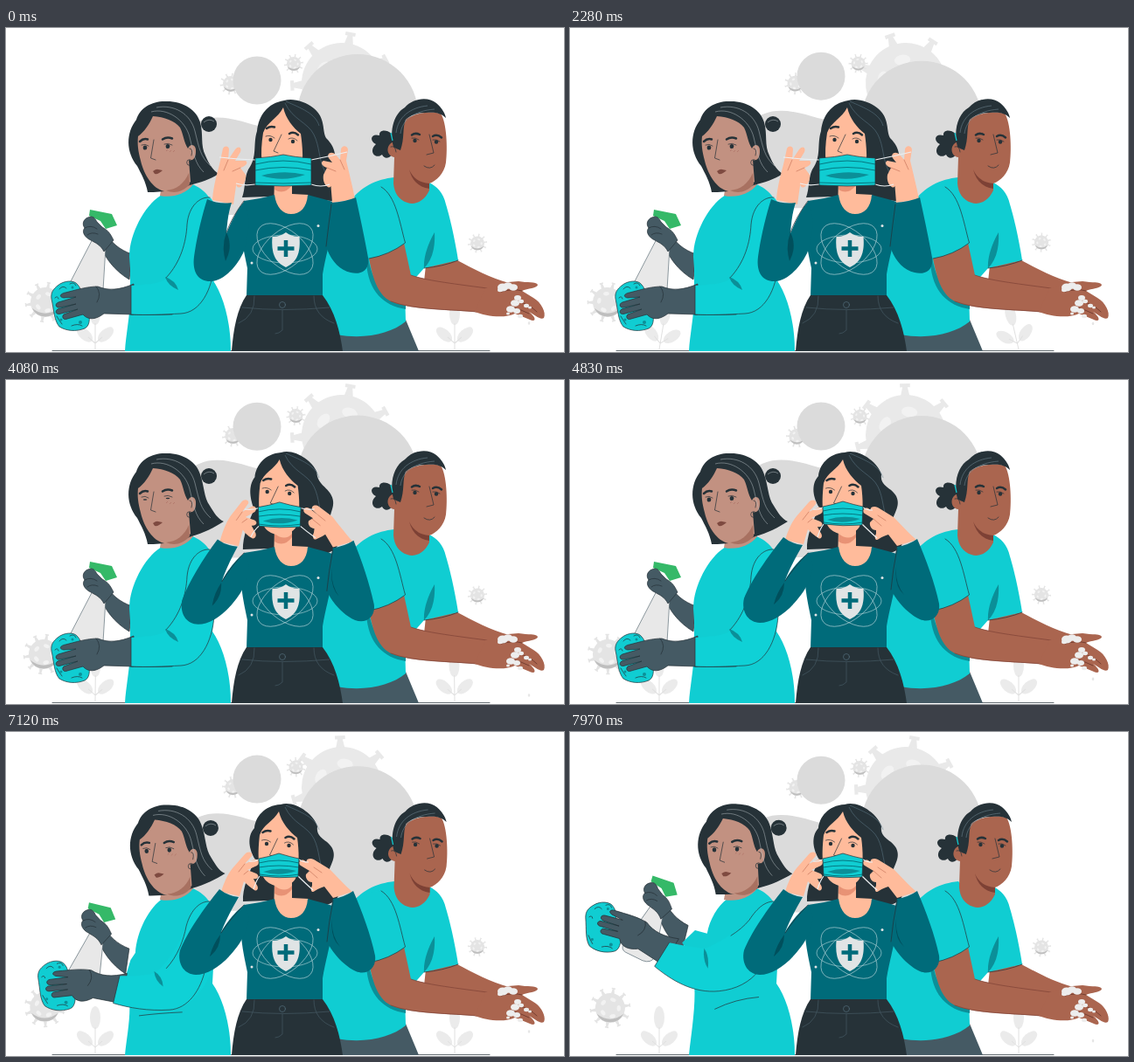
Write an HTML page that moves like this. It is 638 px wide and 371 px high and loops after 8000 ms.

```html
<!DOCTYPE html>
<html lang="en">
<head>
<meta charset="utf-8">
<title>Stay protected</title>
<style>
html, body { margin: 0; width: 100%; height: 100%; overflow: hidden; background: #fff; }
svg { display: block; width: 100vw; height: 100vh; }
.ln { fill: none; stroke: #263238; stroke-width: .7; stroke-linecap: round; stroke-linejoin: round; }
.brow { fill: none; stroke: #263238; stroke-width: 2.5; stroke-linecap: round; }
.strand { fill: none; stroke: #b5bec2; stroke-width: .5; }
.hair { fill: #263238; }
.cyan { fill: #10cdd2; }
.fold { fill: #0b8f98; }
.sweat { fill: #006b7a; }
.deep { fill: #004f5c; }
.skin { fill: #ffbb9b; }
.tan { fill: #c29181; }
.brown { fill: #aa654f; }
.glove { fill: #455a64; }
.edge { stroke: #263238; stroke-width: .7; stroke-linejoin: round; }
</style>
</head>
<body>
<svg viewBox="0 0 638 371" preserveAspectRatio="none">
  <g id="bigVirus"></g>
  <g fill="#dbdbdb">
    <path id="blob" d="M206 190 C205 140 200 104 222 97 C240 89 265 96 284 102 C305 106 320 108 345 115 V205 H206Z"/>
    <path id="dome" d="M333 99 A69 69 0 0 1 471 99 V205 H333Z"/>
  </g>
  <g id="viruses"></g>
  <circle id="ball" cx="287" r="27.5" fill="#dbdbdb"/>
  <g id="plants"></g>
  <path class="ln" d="M53 369.5H553"/>

  <!-- woman with spray and sponge -->
  <g id="spray">
    <path class="glove edge" d="M113 233 C120 246 130 254 144 259 L141 288 C124 278 112 262 108 248Z"/>
    <path d="M104 232 L115 234 L111 300 Q108 308 98 306 L77 299 Q71 296 74 290Z" fill="#e8e8e8" stroke="#455a64" stroke-width=".6"/>
    <path d="M96 208 L121 213 L127 226 L114 230 L108 221 L95 215Z" fill="#35b968"/>
    <path class="glove edge" d="M97 216 C89 217 86 224 90 229 C86 233 90 240 97 243 C102 246 108 248 112 256 L123 243 C119 235 117 232 110 228 L104 222 C102 218 100 216 97 216Z"/>
    <path class="ln" d="M90 229 Q97 225 104 230 M93 237 Q98 233 105 236"/>
  </g>
  <path class="cyan" data-k="wipe" d="M180 190 C160 200 141 235 141 262 L142 275 L142 300 C143 325 137 350 136 370 L257 370 C257 335 248 305 236 288 L240 215 C238 196 226 184 213 179 C203 190 190 194 180 190Z" data-to="M180 191 C169 199 160 214 157 230 L143 226 L128 240 C152 275 140 330 136 370 L257 370 C257 335 248 305 236 288 L240 215 C238 196 226 184 213 179 C203 190 190 194 180 191Z"/>
  <path class="ln" data-k="wipe" d="M142 328 Q160 329 190 328" data-to="M166 317 Q190 305 216 303"/>
  <path class="tan" d="M178 180 L213 150 L214 179 C206 190 190 195 176 192Z"/>
  <g id="headL">
    <circle class="hair" cx="232" cy="110" r="9"/>
    <path class="strand" d="M226 108 Q232 103 238 107"/>
    <path class="hair" data-k="tip" d="M150 158 C137 142 137 120 149 105 C153 91 168 83 184 84 C203 84 218 94 222 108 C226 122 222 134 228 146 C232 156 237 163 243 167 C234 173 222 177 210 180 C196 186 180 188 162 188 C160 176 154 166 150 158Z" data-to="M150 158 C137 142 137 120 149 105 C153 91 168 83 184 84 C203 84 218 94 222 108 C227 122 226 134 233 144 C238 152 242 159 249 162 C238 169 226 175 212 179 C196 186 180 188 162 188 C160 176 154 166 150 158Z"/>
    <path class="tan" d="M151 124 C158 119 164 110 168 101 C181 102 193 106 199 114 C203 122 203 130 208 138 C211 131 218 134 217 142 C217 149 213 153 209 151 L211 176 C203 186 190 189 181 187 C168 184 158 169 154 152 C151 141 150 133 151 124Z"/>
    <path d="M183 186 C195 185 204 178 209 166 L210 179 C202 188 192 190 183 186Z" fill="#a87161"/>
    <path class="strand" d="M166 96 C184 91 205 105 210 125 S216 155 226 165 M172 91 C192 87 211 98 216 118 S222 147 234 158"/>
    <path class="brow" d="M153 130 Q157 126 162 127.500 M179 127.500 Q184 124 190 126.500"/>
    <ellipse class="eyeL hair" cx="159" cy="137" rx="2.300"/>
    <ellipse class="eyeL hair" cx="185" cy="135.500" rx="2.300"/>
    <path class="ln" d="M155 134 Q159 132 163 135 M181 133 Q185 131 190 134 M169 128 L165.500 149 L171 151 M210 138 Q214 138 212 146"/>
    <path d="M168 164 Q172 161 174 162 L179 163 Q174 168 170 167Z" fill="#7e4a40"/>
    <path d="M183 141 l2 -2 M187 142 l2 -2 M191 142 l2 -2" stroke="#a96b60" stroke-width=".6"/>
    <circle class="ln" cx="210" cy="154" r="3.300"/>
  </g>
  <g id="sponge">
    <path class="cyan edge" d="M59 295 C66 289 78 288 82 294 C88 300 85 310 91 318 C97 327 97 341 90 344 C80 348 69 347 61 342 C55 335 55 324 52 310 C51 303 54 299 59 295Z"/>
    <path class="ln" d="M61 299 Q65 294 69 298 M73 293 Q78 290 80 295 M58 330 Q61 335 64 339 M75 341 Q82 338 87 341 M56 309 q3 -3 4 1"/>
    <g class="fold"><circle cx="76" cy="297" r="1.500"/><circle cx="63" cy="334" r="1.500"/><circle cx="85" cy="337" r="2"/></g>
  </g>
  <g id="wiper">
    <path class="glove edge" d="M146 293 C130 300 117 301 105 296 C92 296 80 300 68 303 C62 304 60 308 66 309 L80 308 L60 314 C55 316 57 321 62 320 L80 316 L59 322 C55 325 58 329 63 327 L82 322 L66 328 C63 331 66 335 70 333 L88 328 C94 335 103 334 112 327 L146 328Z"/>
    <path class="ln" d="M103 296 Q110 304 104 314"/>
  </g>
  <path data-k="wipe" fill="#0fd1d6" d="M143 295 C160 294 175 293 184 287 C200 270 206 245 207 225 C209 203 222 193 233 194 C243 200 240 240 238 270 C236 300 222 326 200 327 C180 328 160 329 143 328Z" data-to="M113 240 C128 243 143 246 154 247 C172 240 190 228 205 215 C215 200 224 194 233 194 C243 205 243 230 236 250 C225 270 200 292 170 296 C140 299 115 283 96 267Z"/>
  <path class="ln" data-k="wipe" d="M183 286 C200 268 206 245 207 225 C209 203 222 193 233 194 M238 270 C236 300 222 326 200 327 C180 328 160 329 143 328 L143 295" data-to="M184 232 C192 227 199 222 205 215 C215 200 224 194 233 194 M215 274 C205 286 190 294 170 296 C140 299 115 283 96 267 L113 240"/>
  <path class="fold" data-k="wipe" d="M182 285 Q194 289 197 300 Q185 295 182 285Z" data-to="M153 247 Q159 256 157 270 Q151 260 153 247Z"/>

  <!-- man washing hands -->
  <path class="glove" d="M376 345 L457 334 L472 370 H380Z"/>
  <path class="brown" d="M480 272 L516 266 C535 276 553 286 575 292 L570 312 C535 302 505 294 478 290Z"/>
  <path class="cyan" d="M444 171 C424 173 404 182 393 200 L352 260 L354 300 L378 351 C410 357 440 350 457 336 L456 300 L478 275 L517 266 C513 240 507 215 503 202 C500 188 492 181 484 177 L464 195Z"/>
  <path class="fold" d="M490 234 C491 252 487 266 478 275 C477 262 483 246 490 234Z M414 262 C418 290 432 308 457 316 V322 C432 318 414 302 412 268Z"/>
  <path class="brown" d="M415 264 L455 246 L463 283 C485 290 520 294 560 299 L556 327 C515 322 465 324 440 313 C424 305 419 284 415 264Z"/>
  <path class="cyan" d="M394 203 C403 184 425 179 436 185 C447 200 452 225 457 246 Q438 260 415 264Z"/>
  <path class="ln" d="M429 182 C446 192 450 223 456.500 246 Q438 260 415 264 M517 266 Q500 273 478 275"/>
  <path class="ln" style="stroke:#7d4135" d="M463 283 C480 289 505 292 550 298 M440 313 C465 323 510 322 538 325"/>
  <path class="brown" d="M548 298 C560 296 566 292 574 291 L586 290 C596 292 606 290 608 294 C608 298 596 298 590 301 L603 309 C612 314 618 326 615 332 C611 335 604 328 598 325 C607 332 606 337 599 334 L582 327 C570 333 548 330 536 325Z"/>
  <path class="ln" style="stroke:#5f2f26" d="M566 302 Q580 298 590 301 M585 313 Q598 316 607 325 M580 320 Q590 323 598 327"/>
  <g id="foam" fill="#ededed"></g>
  <ellipse id="drop" rx="1.300" fill="#e6e6e6"/>
  <g id="headR">
    <path class="hair" d="M441 121 C434 115 426 117 427 123 C417 120 415 129 423 133 C414 141 422 151 430 145 C434 153 443 147 444 138Z"/>
    <path class="brown" d="M444 130 L458 104 C470 96 488 95 497 98 C504 108 505 138 503 154 C501 167 492 175 484 178 V186 C478 199 467 203 459 200 C449 197 444 189 443 178 L444 148 C434 146 434 133 444 130Z"/>
    <path d="M461 162 C465 172 473 177 484 178 V184 C471 182 464 174 461 162Z" fill="#7d4135"/>
    <path class="hair" d="M443 136 C438 116 444 98 456 91 C465 80 483 78 492 86 C499 92 502 98 503 103 C497 97 490 96 480 97 C470 97 462 100 457 105 C453 114 456 126 451 140 L446 138Z"/>
    <path class="strand" style="stroke:#78909c" d="M446 120 C448 102 462 91 482 89 M451 121 C453 105 466 95 490 93"/>
    <path class="brow" d="M464 122.500 Q468 119.500 473 122 M488 124 Q493 121 498 125.500"/>
    <circle class="hair" cx="467.500" cy="129" r="2.200"/><circle class="hair" cx="492" cy="130.500" r="2.200"/>
    <path class="ln" d="M464 126 Q468 125 472 128 M488 128 Q492 127 496 130 M484 122 L489 143 L481 145 M478 158 Q485 163 490 157 M440 136 Q445 134 446 142"/>
    <path d="M440 120 l2 9" stroke="#10cdd2" stroke-width="1.200"/>
  </g>

  <!-- woman with mask -->
  <path class="hair" data-k="mask" d="M318 83 C299 86 289 100 287 118 C282 134 288 147 277 162 C272 173 274 183 270 194 L330 192 L378 199 C388 186 374 176 375 160 C379 143 374 134 366 126 C361 117 366 104 352 92 C342 84 328 80 318 83Z" data-to="M314 83 C295 84 285 98 284 110 C275 120 278 135 285 146 C278 160 270 180 271 194 L330 192 L366 198 C385 193 384 178 371 168 C364 156 380 148 373 133 C368 123 354 122 356 108 C352 94 330 78 314 83Z"/>
  <path class="skin" d="M307 168 H327 V190 L346 191 L344 216 H306Z"/>
  <path d="M307 176 Q319 185 327 176 V180 Q318 192 307 185Z" fill="#e89275"/>
  <path class="skin" data-k="mask" d="M317 91 C311 103 298 108 294 120 C290 145 292 165 300 176 C310 184 330 182 336 170 C341 155 339 135 337 121 C328 114 320 104 317 91Z" data-to="M312 91 C306 102 294 106 290 118 C287 145 289 160 297 170 C307 180 325 178 331 168 C336 155 335 135 333 121 C324 114 315 104 312 91Z"/>
  <path class="strand" style="stroke:#607d8b" d="M319 86 C328 105 345 108 352 122 S357 150 365 165 M320 84 C338 92 354 98 358 112"/>
  <g id="face">
    <path class="brow" d="M298 115 Q302 112 307 113.500 M324 121 Q329 118 334 122.500"/>
    <circle class="hair" cx="302.500" cy="128" r="2.200"/><circle class="hair" cx="328" cy="130" r="2.200"/>
    <path class="ln" d="M297 124 Q302 122 307 126 M323 127 Q328 124 333 129 M315 122 L306 141 L311 143"/>
  </g>
  <path class="sweat" d="M272 198 C285 196 297 194 307 191 C309 206 317 213 326 213 C336 213 344 206 345 191 C354 194 366 196 373 199 C378 225 366 255 362 282 L362 307 H275 L276 275 C272 255 264 225 272 198Z"/>
  <path class="hair" d="M275 306 H362 C376 324 382 348 385 370 H258 C260 345 264 322 275 306Z"/>
  <path class="ln" style="stroke:#455a64" d="M270 320 Q316 325 370 320 M316 323 V346 Q312 350 308 350 M284 307 Q285 330 266 338 M352 307 Q352 330 375 338"/>
  <circle class="ln" style="stroke:#546e7a" cx="316" cy="317" r="3.500"/>
  <g fill="none" stroke="#bfd8dc" stroke-width=".6">
    <ellipse cx="319" cy="253" rx="38" ry="21" transform="rotate(40 319 253)"/>
    <ellipse cx="319" cy="253" rx="38" ry="21" transform="rotate(-40 319 253)"/>
    <ellipse cx="319" cy="253" rx="37" ry="16"/>
  </g>
  <g fill="#e0e4e5"><circle cx="357" cy="226.500" r="1.500"/><circle cx="281" cy="269" r="1.500"/>
    <path d="M320 234 C315 238 309 239 304.500 239 C303 257 307 268 320 274 C333 268 337 257 335.500 239 C331 239 325 238 320 234Z"/></g>
  <path d="M320 243 V262 M310.500 252.500 H329.500" stroke="#006b7a" stroke-width="4.500"/>
  <path class="skin" data-k="mask" d="M236 197 C237 180 242 165 245 152 L248 138 C250 134 255 135 255 139 L254 151 L262 139 C266 134 270 137 268 142 L262 152 L274 152 C277 154 275 158 268 160 L274 168 C275 173 272 180 268 182 C264 184 262 180 264 174 L260 202Z" data-to="M246 183 C250 170 254 162 259 156 L273 140 C276 136 283 137 281 142 L273 151 L284 146 C289 145 291 150 287 153 L276 158 L286 162 C290 164 289 169 283 168 L286 174 C290 179 287 183 284 181 C279 178 275 174 272 171 L267 188Z"/>
  <path class="skin" data-k="mask" d="M399 196 C396 180 392 165 389 152 L391 139 C390 134 384 134 383 139 L382 151 L377 145 C372 140 366 144 369 149 L373 154 L363 152 C359 154 361 158 367 160 L363 168 C362 174 364 180 368 182 C371 184 373 180 371 175 L373 200Z" data-to="M396 183 C386 174 377 164 370 157 L352 146 C346 143 341 147 345 151 L352 155 L341 147 C336 145 333 150 337 153 L347 159 L343 163 C342 167 345 172 350 172 L350 176 C347 181 350 185 353 182 C358 179 361 178 364 177 L374 190Z"/>
  <path class="ln" data-k="mask" style="stroke:#c9785e" d="M254 151 L249 163 M268 160 L259 164 M382 151 L387 162 M367 160 L377 164" data-to="M273 151 L266 160 M277 159 L272 163 M352 155 L361 161 M347 159 L356 167"/>
  <path class="sweat" data-k="mask" d="M230 196 Q243 202 258 200 C254 212 253 223 252 235 C259 219 265 206 273 198 C280 216 278 240 271 258 C262 276 248 289 235 290 C218 291 213 277 215 262 C218 240 224 215 230 196Z" data-to="M244 180 Q254 188 266 189 C258 203 251 216 246 229 C254 215 264 204 273 198 C282 212 276 228 267 242 C252 264 233 278 217 278 C201 277 196 262 199 250 C207 230 226 202 244 180Z"/>
  <path class="sweat" data-k="mask" d="M372 200 Q388 199 400 194 C405 217 410 240 414 263 C416 278 405 283 394 280 C381 277 371 266 366 250 C366 230 368 215 372 200Z" data-to="M374 191 Q387 189 397 182 C407 205 417 232 422 256 C424 271 412 279 400 274 C385 267 373 252 367 240 C367 225 369 212 374 191Z"/>
  <path class="deep" data-k="mask" d="M252 234 Q260 250 251 267 Q246 250 252 234Z M371 215 Q367 240 374 258 Q367 240 371 215Z" data-to="M245 232 Q245 248 233 257 Q236 244 245 232Z M373 212 Q371 232 382 246 Q370 236 373 212Z"/>
  <path class="ln" data-k="mask" d="M272 198 Q258 217 252 234 M366 250 Q369 224 372 202" data-to="M272 198 Q255 216 246 230 M367 240 Q369 218 374 193"/>
  <path data-k="mask" fill="none" stroke="#eceff1" stroke-width="1.200" d="M285 151 Q262 150 244 148 M285 179 Q272 181 263 178 M349 151 Q370 147 390 142 M349 179 Q360 183 370 179" data-to="M289 146 Q284 149 278 148 M290 165 Q286 170 283 180 M335 146 Q339 149 346 149 M334 165 Q341 172 351 181"/>
  <path class="cyan edge" data-k="mask" d="M285 149 Q304 148 317 145 Q330 148 349 149 L349 180 Q317 182 285 180Z" data-to="M289 145 Q300 143 312 139 Q325 143 335 145 L334 166 Q312 168 290 165Z"/>
  <path class="ln" data-k="mask" style="stroke:#00525e" d="M285 156 Q317 148 349 156 M285 163 Q317 156 349 163 M285 177 Q317 179 349 177" data-to="M289 150 Q312 144 335 150 M289 155 Q312 151 335 155 M290 163 Q312 167 335 163"/>
  <path class="fold" data-k="mask" d="M292 169 Q317 162 342 168 Q317 177 292 169Z" data-to="M294 160 Q312 154 332 159 Q312 166 294 160Z"/>
</svg>
<script>
const $ = id => document.getElementById(id);
const LOOP = 8000, TAU = Math.PI * 2;
const smooth = (a, b, t) => {
  const u = Math.min(1, Math.max(0, (t - a) / (b - a)));
  return u * u * (3 - 2 * u);
};
const set = (el, attrs) => { for (const k in attrs) el.setAttribute(k, attrs[k]); };

// Paths that blend between two poses, with separate progress for x and y
const NUM = /-?\d+(\.\d+)?/g;
const morphs = [...document.querySelectorAll('[data-to]')].map(el => ({
  el, key: el.dataset.k, from: el.getAttribute('d'), to: el.dataset.to.match(NUM).map(Number)
}));
function blend(m, [px, py]) {
  let i = 0;
  m.el.setAttribute('d', m.from.replace(NUM, n => {
    const p = i % 2 ? py : px;
    return (+n + (m.to[i++] - n) * p).toFixed(2);
  }));
}

function virus(r, spikes, reach, body, shade) {
  const w = r * .09, tip = r * reach;
  let arms = '', spots = '';
  for (let i = 0; i < spikes; i++)
    arms += `<path transform="rotate(${10 + i * 360 / spikes})" d="M${-w * 1.3} ${-r * .95}L${-w * .7} ${-tip}H${-w * 1.4}V${-tip - w}H${w * 1.4}V${-tip}H${w * .7}L${w * 1.3} ${-r * .95}Z"/>`;
  for (let i = 0; i < 5; i++)
    spots += `<ellipse transform="rotate(${i * 72 + 20})" cy="${-r * .58}" rx="${r * .2}" ry="${r * .13}" fill="#f2f2f2"/>`;
  return `<g class="spin" fill="${body}">${arms}<circle r="${r}"/>${spots}</g>
    <path fill="${shade}" d="M${-r * .9} ${r * .4}A${r} ${r} 0 0 0 ${r * .9} ${r * .4}Q0 ${r * 1.1} ${-r * .9} ${r * .4}Z"/>`;
}
$('bigVirus').innerHTML = `<g transform="translate(384 63)">${virus(46, 7, 1.19, '#e9e9e9', '#dcdcdc')}</g>`;
const small = [[257, 64, 9], [329, 41, 8], [539, 246, 8], [45, 314, 17]];
$('viruses').innerHTML = small.map(([, , r]) => `<g class="bob">${virus(r, 10, 1.28, '#e4e4e4', '#bebebe')}</g>`).join('');
const bobs = document.querySelectorAll('.bob'), spins = document.querySelectorAll('.spin');

const leaf = (x, y, a, ry) => `<ellipse rx="6" ry="${ry}" transform="translate(${x} ${y}) rotate(${a})"/>`;
$('plants').innerHTML = '<g class="plant"></g>'.repeat(2);
const plants = document.querySelectorAll('.plant');
plants.forEach(p => p.innerHTML = `<g fill="#ebebeb">${leaf(0, -41, 0, 13)}${leaf(-12, -17, -48, 11)}${leaf(12, -17, 48, 11)}</g>
  <path d="M0 0V-30M0 -7L-8 -14M0 -7L8 -14" fill="none" stroke="#e0e0e0" stroke-width="1"/>`);

const suds = [[568, 297, 6], [574, 295, 5], [580, 297, 5], [565, 300, 3], [585, 309, 4], [589, 313, 3],
  [582, 315, 5], [577, 322, 5], [584, 324, 4], [595, 318, 3], [599, 320, 2], [588, 330, 3], [574, 327, 2]];
$('foam').innerHTML = suds.map(([x, y, r]) => `<ellipse cx="${x}" cy="${y}" rx="${r}" ry="${r * .75}"/>`).join('');
const eyes = document.querySelectorAll('.eyeL');

function draw(t) {
  const lead = smooth(6300, 8100, t), wipe = lead ** 1.5;
  const mask = smooth(2500, 4600, t), tip = smooth(2900, 4100, t);
  const pose = { wipe: [lead, wipe], mask: [mask, mask], tip: [tip, tip] };
  morphs.forEach(m => blend(m, pose[m.key]));

  const u = ((t - 5100) / 5100) ** 2;
  set($('ball'), { cy: 53 + 7 * u });
  set($('dome'), { transform: `translate(0 ${11 - 11 * u})` });
  set($('blob'), { transform: `translate(0 ${-2 + 11 * u})` });

  const swing = Math.cos(TAU * t / 4000);
  spins.forEach((s, i) => set(s, { transform: `rotate(${(i % 2 ? -1 : 1) * 15 * (swing - 1)})` }));
  small.forEach(([x, y], i) => {
    const dx = i === 3 ? 3 * lead - 2 * smooth(0, 2000, t) : i < 2 ? 2.5 * smooth(1500, 4000, t) : 0;
    const dy = i === 3 ? 2 * lead : i === 2 ? .5 * swing : .8 * Math.sin(TAU * t / 4000);
    set(bobs[i], { transform: `translate(${x + dx} ${y + dy})` });
  });
  const sway = Math.exp(-(((t - 2600) / 850) ** 2));
  set(plants[0], { transform: `translate(102 368) rotate(${11 * sway})` });
  set(plants[1], { transform: `translate(513 368) rotate(${-15 * sway})` });

  set($('headL'), { transform: `translate(${5 * wipe} ${-1.5 * wipe}) rotate(${1.5 * wipe} 185 180)` });
  set($('headR'), { transform: `translate(${2 * wipe} 0)` });
  set($('face'), { transform: `translate(${-4.5 * mask} 0)` });
  set($('spray'), { transform: `translate(${-4 * lead} ${-43 * wipe}) rotate(${8 * wipe} 108 225)` });
  set($('wiper'), { transform: `translate(${-24 * lead} ${-97 * wipe}) rotate(${32 * wipe} 78 316)` });
  set($('sponge'), { transform: `translate(${-36 * lead} ${-97 * wipe}) rotate(${8 * wipe} 74 318)` });

  const shut = Math.max(0, 1 - Math.abs(t - 4100) / 130);
  eyes.forEach(e => set(e, { ry: 2.6 - 2.2 * shut }));
  set($('drop'), { cx: 598, cy: 334 + (t / 80 + 4) % 28, ry: 1.8 });
}

const start = performance.now();
(function tick() {
  draw((performance.now() - start) % LOOP);
  requestAnimationFrame(tick);
})();
</script>
</body>
</html>
```
